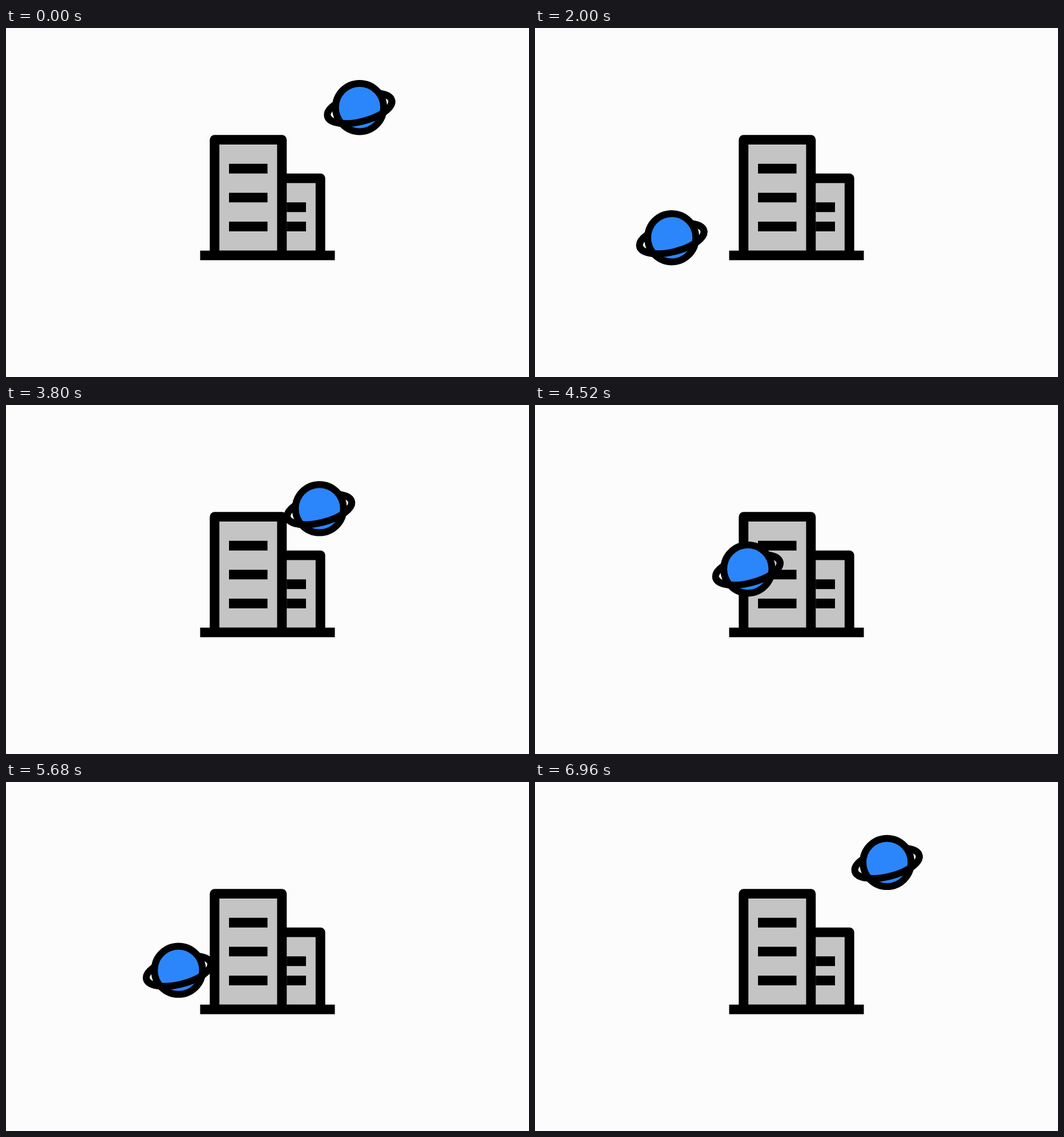
An HTML page for the animation above (7 s loop, 917x611 px).

```html
<!DOCTYPE html>
<html lang="en">
<head>
<meta charset="utf-8">
<title>Planet passing a building</title>
<style>
  html, body { margin: 0; width: 100%; height: 100%; overflow: hidden; background: #fcfcfc; }
  svg { display: block; width: 917px; height: 611px; }
</style>
</head>
<body>
<svg viewBox="0 0 917 611">
  <!-- Buildings on a 14 x 13 unit grid -->
  <g transform="translate(340.4 187.2) scale(16.87)">
    <path d="M8 4H12.5a.5 .5 0 0 1 .5 .5V12.5H8z"/>
    <path d="M1 12.5V.5a.5 .5 0 0 1 .5-.5H8.5a.5 .5 0 0 1 .5 .5V12.5z"/>
    <path d="M2 1H8V12H2zM9 5H12V12H9z" fill="#c4c4c4"/>
    <path d="M0 12H14V13H0zM3 3H7V4H3zM3 6H7V7H3zM3 9H7V10H3zM9 7H11V8H9zM9 9H11V10H9z"/>
  </g>
  <g id="planet" fill="none" stroke="#000" stroke-width="12">
    <ellipse cy="1.3" rx="58" ry="23.4" transform="rotate(-14 0 1.3)"/>
    <circle r="42.2" fill="#2b86fb"/>
    <path d="M-58 1.3A58 23.4 0 0 0 58 1.3" transform="rotate(-14 0 1.3)"/>
  </g>
</svg>
<script>
const planet = document.getElementById('planet');
const LOOP = 7000, STEP = 40, FILM_RATE = 23.976 / 25;
const CYCLE = 84, TURN = 47;
const START = [620, 139.2], END = [239.8, 367.2];

// Steady departure, soft arrival: cubic-bezier(.167, .167, x2, 1)
function ease(u, x2) {
  const bez = (s, a, b) => 3 * (1 - s) ** 2 * s * a + 3 * (1 - s) * s * s * b + s ** 3;
  let lo = 0, hi = 1;
  for (let i = 0; i < 24; i++) {
    const mid = (lo + hi) / 2;
    if (bez(mid, .167, x2) < u) lo = mid; else hi = mid;
  }
  return bez(lo, .167, 1);
}

function draw() {
  // Film-rate motion shown on a 25 fps clock
  const tick = Math.floor(performance.now() % LOOP / STEP);
  const n = Math.floor(tick * FILM_RATE) % CYCLE;
  const k = n < TURN ? ease(n / TURN, .667) : 1 - ease((n - TURN) / (CYCLE - TURN), .683);
  const [x, y] = START.map((a, i) => a + (END[i] - a) * k);
  planet.setAttribute('transform', `translate(${x} ${y})`);
  requestAnimationFrame(draw);
}
draw();
</script>
</body>
</html>
```
